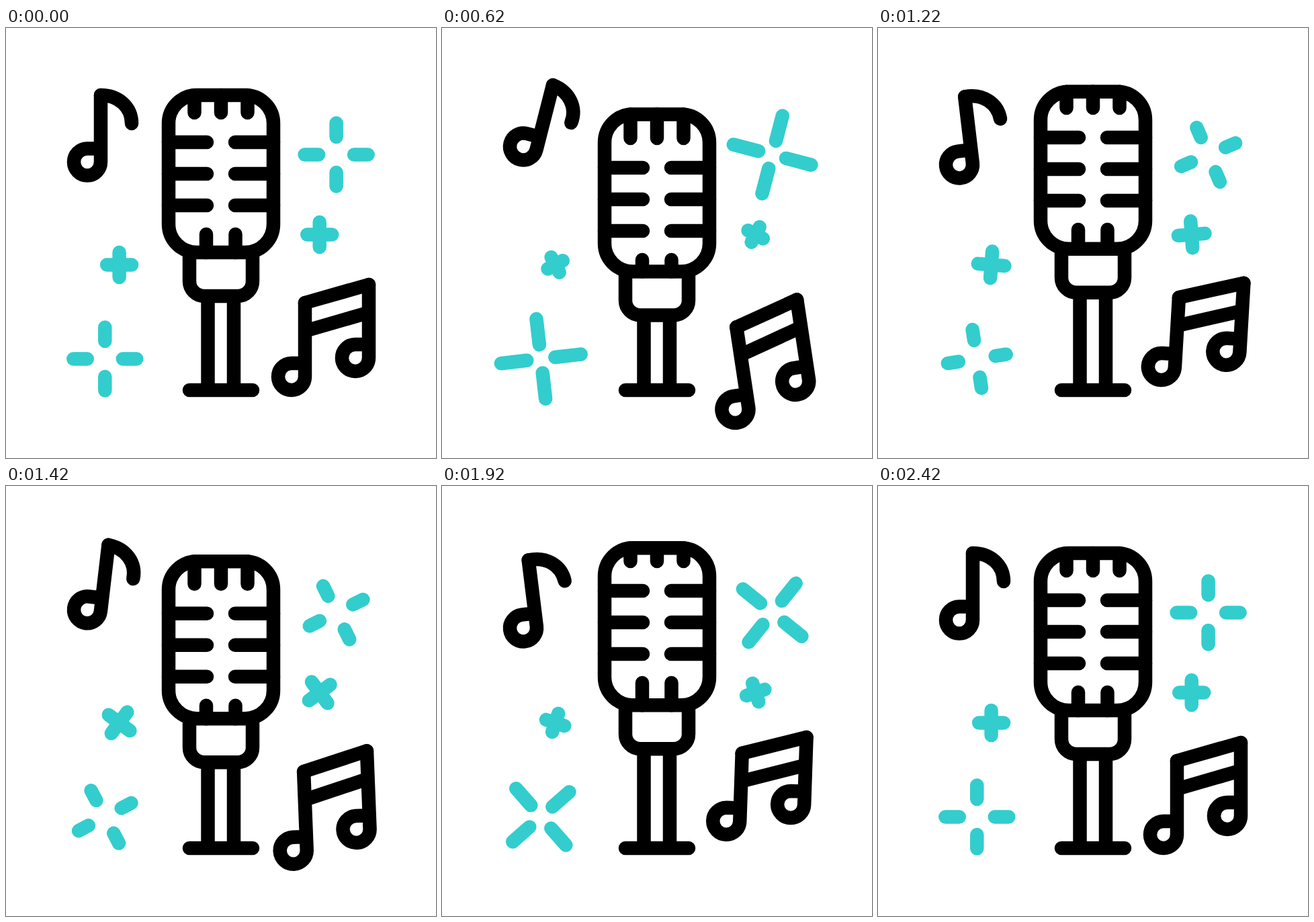
An HTML page for the animation above (2.6 s loop, 640 by 640 pixels).

```html
<!DOCTYPE html>
<html lang="en">
<head>
<meta charset="utf-8">
<title>Microphone and notes</title>
<style>
  html, body { margin: 0; width: 100%; height: 100%; overflow: hidden; background: #fff; }
  svg { display: block; width: 100vw; height: 100vh; }
  path { fill: none; stroke: #000; stroke-width: 20.5; stroke-linecap: round; stroke-linejoin: round; }
  .butt { stroke-linecap: butt; }
  .spark { stroke: #33cdcd; }
</style>
</head>
<body>
<svg viewBox="0 0 640 640">
  <path id="pole" class="butt"/>
  <path d="M273 539H367"/>
  <g id="mic">
    <path d="M284 100H356A42 42 0 0 1 398 142V292A42 42 0 0 1 356 334H284A42 42 0 0 1 242 292V142A42 42 0 0 1 284 100Z"/>
    <path class="butt" d="M273 334V377A22 22 0 0 0 295 399H345A22 22 0 0 0 367 377V334"/>
    <path id="grille"/>
  </g>
  <g id="single">
    <path d="M141 179.500H121A20 20 0 1 0 141 199.500V100"/>
    <path id="flag" d="M141 100C168 100 187 118 187 142"/>
  </g>
  <g id="pair">
    <path d="M445 409L540 382"/>
    <path class="butt" d="M445 451L540 423.500"/>
    <path id="stems"/>
  </g>
  <path id="bigL" class="spark"/>
  <path id="bigR" class="spark"/>
  <path id="smallL" class="spark"/>
  <path id="smallR" class="spark"/>
</svg>
<script>
const LOOP = 2600, STEP = 20, START = 200, END = 2420;
const BEAT = 415, LATE = 440;   // half swings; trailing parts swing slower
const { PI, sin, cos, min, max, floor } = Math;
const $ = id => document.getElementById(id);
const set = (id, name, value) => $(id).setAttribute(name, value);
const ease = x => 0.5 - 0.5 * cos(PI * min(1, max(0, x)));

// Four alternating swings, each a fixed share of the one before, then rest.
function sway(t, size, decay, beat) {
  const x = max(0, (t - START) / beat), n = floor(x);
  const peak = k => k < 1 || k > 4 ? 0 : size * (-decay) ** (k - 1);
  return peak(n) + (peak(n + 1) - peak(n)) * ease(x - n);
}

function drawMic(t) {
  const dy = sway(t, 28.5, 0.66, BEAT);
  const inner = sway(t, 38, 0.73, BEAT) - dy;
  set("mic", "transform", `translate(0 ${dy})`);
  let d = "";
  for (const x of [280.5, 320, 359.5]) d += `M${x} 100V${126 + inner}`;
  for (const y of [170, 217, 264]) d += `M242 ${y + inner}H299M341 ${y + inner}H398`;
  for (const x of [298, 341.5]) d += `M${x} 334V${307 + inner}`;
  set("grille", "d", d);
  set("pole", "d", `M300.500 ${399 + dy}V539M339 ${399 + dy}V539`);
}

function drawNotes(t) {
  const lag = sway(t, 1, 0.92, LATE);

  const rise = sway(t, -23, 0.82, BEAT);
  const tilt = sway(t, 14.4, 0.8, LATE);
  set("single", "transform", `translate(0 ${rise}) rotate(${tilt} 121 199.5)`);
  set("flag", "transform", `rotate(${7.4 * lag} 141 100)`);

  const dy = sway(t, 28.7, 0.71, BEAT);
  const turn = sway(t, -8.6, 0.62, LATE);
  set("pair", "transform", `translate(0 ${dy}) rotate(${turn} 492 458)`);
  const head = (x, y, top) =>
    `M${x} ${y - 20 + 11 * lag}h-20.500a20 20 0 1 0 20.500 20V${top}`;
  set("stems", "d", head(445, 519, 409) + head(540, 491, 382));
}

function star(id, cx, cy, r0, r1, deg) {
  let d = "";
  for (let k = 0; k < 4; k++) {
    const a = deg * PI / 180 + k * PI / 2, s = sin(a), c = -cos(a);
    d += `M${cx + r0 * s} ${cy + r0 * c}L${cx + r1 * s} ${cy + r1 * c}`;
  }
  set(id, "d", d);
}

function drawStars(t) {
  const u = min(1, max(0, (t - START) / (END - START)));
  // Two fading pulses around a short dip.
  const grow = 18 * (1 - u / 2) * sin(2 * PI * u) ** 2 - 4 * sin(PI * u) ** 2;
  // Near-steady turning; a larger bend means softer ends.
  const spin = bend => u - 0.035 * sin(PI * u) - bend * sin(2 * PI * u);
  const r0 = 26.5 - 0.42 * grow, r1 = 47 + grow, r = 18.5 - 0.45 * grow;
  star("bigL", 147.3, 492.4, r0, r1, 630 * spin(0.04));
  star("bigR", 491.6, 188.6, r0, r1, -720 * spin(0.07));
  const turn = 360 * ease((t - 270) / 1930);
  star("smallL", 168.6, 352.4, 0, r, -turn);
  star("smallR", 466.7, 307.4, 0, r, turn);
}

function draw(ms) {
  const t = floor((ms % LOOP) / STEP) * STEP;
  drawMic(t);
  drawNotes(t);
  drawStars(t);
}

let start = null;
function tick(now) {
  if (start === null) start = now;
  draw(now - start);
  requestAnimationFrame(tick);
}
draw(0);
requestAnimationFrame(tick);
</script>
</body>
</html>
```
